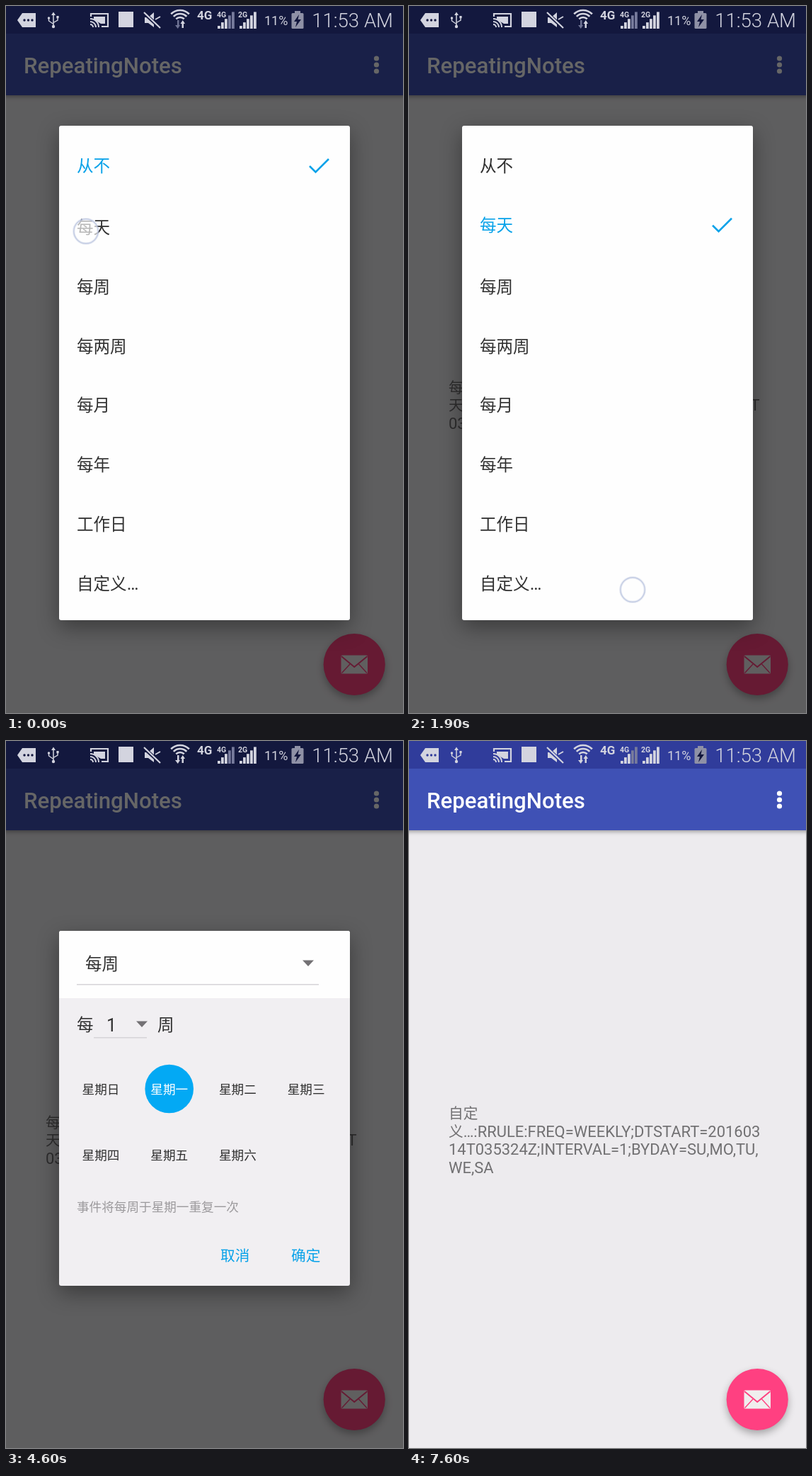
Recreate the animation shown at these times as an HTML page with a canvas. Size 561 px wide and 998 px high, loop 8000 ms.

```html
<!DOCTYPE html>
<html lang="zh-CN">
<head>
<meta charset="utf-8">
<title>Repeat picker</title>
<style>
html, body { margin: 0; width: 100%; height: 100%; overflow: hidden; background: #edebee; }
canvas { display: block; width: 561px; height: 998px; }
</style>
</head>
<body>
<canvas id="stage"></canvas>
<script>
const W = 561, H = 998, LOOP = 8000;
const canvas = document.getElementById('stage');
const ctx = canvas.getContext('2d');
const dpr = window.devicePixelRatio || 1;
canvas.width = W * dpr;
canvas.height = H * dpr;

const INK = '#303030', ACCENT = '#03a9f4', LINK = '#08a2e9', PINK = '#ff4081';
const ICON = '#d3d4df';
const LATIN = 'Roboto, "Noto Sans", sans-serif';
const CJK = '"Noto Sans CJK SC", "Noto Sans CJK", sans-serif';
const LEFT = 75, WIDTH = 411;

const OPTIONS = ['从不', '每天', '每周', '每两周', '每月', '每年', '工作日', '自定义…'];
const UNITS = ['每天', '每周', '每月', '每年'];
const DAYS = [...'日一二三四五六'].map(d => '星期' + d);
const PICKED_AT = [6850, 0, 5500, 6000, Infinity, Infinity, 6400];
const DAILY = ['每', '天:RRULE:FREQ=DAILY;DTSTART=20160314T', '035322Z;INTERVAL=1'];
const WEEKLY = ['自定', '义…:RRULE:FREQ=WEEKLY;DTSTART=201603',
  '14T035324Z;INTERVAL=1;BYDAY=SU,MO,TU,', 'WE,SA'];

// start, end, x, y
const TOUCHES = [
  [0, 150, 113, 318], [800, 1000, 162, 583], [1900, 2100, 316, 824],
  [3000, 3180, 166, 417], [3900, 4080, 182, 484], [5400, 5580, 330, 494],
  [5900, 6080, 427, 494], [6300, 6480, 330, 588], [6750, 6930, 137, 484],
  [7200, 7400, 437, 742]
];

const ramp = (t, a, b) => Math.min(1, Math.max(0, (t - a) / (b - a)));
const ease = (t, a, b) => { const k = ramp(t, a, b); return k * k * (3 - 2 * k); };
const within = (t, a, b) => t >= a && t < b;

function mix(rgb, k) {
  return `rgb(${rgb.map(v => Math.round(v * k)).join(',')})`;
}

function rect(x, y, w, h, color) {
  ctx.fillStyle = color;
  ctx.fillRect(x, y, w, h);
}

function disc(x, y, r, color) {
  ctx.beginPath();
  ctx.arc(x, y, r, 0, 7);
  ctx.fillStyle = color;
  ctx.fill();
}

function path(points, closed) {
  ctx.beginPath();
  points.forEach(([x, y]) => ctx.lineTo(x, y));
  if (closed) ctx.closePath();
}

function shape(points, color) {
  path(points, true);
  ctx.fillStyle = color;
  ctx.fill();
}

function line(points, color, width) {
  path(points);
  ctx.strokeStyle = color;
  ctx.lineWidth = width;
  ctx.stroke();
}

function arc(x, y, r, a, b, color, width) {
  ctx.beginPath();
  ctx.arc(x, y, r, a, b);
  ctx.strokeStyle = color;
  ctx.lineWidth = width;
  ctx.stroke();
}

function panel(x, y, w, h, r, color) {
  ctx.beginPath();
  ctx.roundRect(x, y, w, h, r);
  ctx.fillStyle = color;
  ctx.fill();
}

function shadowed(blur, dy, alpha, draw) {
  ctx.save();
  ctx.shadowColor = `rgba(0,0,0,${alpha})`;
  ctx.shadowBlur = blur * dpr;
  ctx.shadowOffsetY = dy * dpr;
  draw();
  ctx.restore();
}

function faded(alpha, draw) {
  if (alpha <= 0) return;
  ctx.save();
  ctx.globalAlpha *= alpha;
  draw();
  ctx.restore();
}

// Chinese runs are set a little smaller than Latin runs.
function text(s, x, y, size, color, align = 0, weight = 400) {
  const runs = s.match(/[\u4e00-\u9fff]+|[^\u4e00-\u9fff]+/g);
  const font = run => /[\u4e00-\u9fff]/.test(run)
    ? `${weight} ${size * 0.942}px ${CJK}` : `${weight} ${size}px ${LATIN}`;
  const widths = runs.map(run => {
    ctx.font = font(run);
    return ctx.measureText(run).width;
  });
  x -= widths.reduce((a, b) => a + b, 0) * align;
  ctx.fillStyle = color;
  runs.forEach((run, i) => {
    ctx.font = font(run);
    ctx.fillText(run, x, Math.round(y + size * 0.358));
    x += widths[i];
  });
}

function bars(x, strong) {
  for (let i = 0; i < 5; i++) {
    const h = 4 + i * 4.9;
    rect(x + i * 5, 32 - h, 3.8, h, i < strong ? ICON : '#777b9c');
  }
}

function statusIcons(t, back) {
  const c = ICON;
  shape([[16, 20], [23, 10], [42, 10], [42, 30], [23, 30]], c);
  for (const x of [26, 31.5, 37]) disc(x, 20, 1.7, back);

  line([[67, 11], [67, 30]], c, 1.5);
  shape([[64, 13], [67, 8.5], [70, 13]], c);
  line([[60.5, 17], [60.5, 21], [67, 25.5]], c, 1.4);
  line([[73, 16], [73, 20], [67, 23.5]], c, 1.4);
  disc(60.5, 17, 1.7, c);
  disc(67, 29, 2.2, c);
  rect(71.4, 14, 3.2, 3.2, c);

  line([[120, 15], [120, 11], [144, 11], [144, 29], [135, 29]], c, 2.2);
  shape([[124, 15], [140, 15], [140, 25], [134, 25], [124, 19]], c);
  for (const r of [4, 8, 12]) arc(119, 30, r, -Math.PI / 2, 0, c, 2);

  rect(159, 8, 21, 22, c);

  shape([[196, 16], [201, 16], [209, 9], [209, 30], [201, 24], [196, 24]], c);
  line([[195, 10], [217, 30]], back, 5);
  line([[195, 9], [218, 31]], c, 2.2);
  line([[211, 19], [218, 15]], c, 2);

  for (const r of [8, 13, 18]) arc(246, 24, r, -2.36, -0.78, c, 2.7);
  const busy = within(t, 400, 1400) || within(t, 3900, 5200) || t >= 5400;
  shape([[239, 27], [242, 27], [242, 20], [244.5, 20], [244.5, 27], [246, 27], [242.8, 32]],
    busy ? c : '#6f7394');
  shape([[246.5, 25], [249.8, 20], [253, 25], [251, 25], [251, 31], [248.5, 31], [248.5, 25]], c);

  text('4G', 270, 13, 17, c, 0, 700);
  bars(299, 3);
  bars(330, 5);
  panel(297, 6, 16, 12, 0, back);
  panel(327, 6, 15, 12, 0, back);
  text('4G', 298, 12, 10.5, c, 0, 700);
  text('2G', 328, 12, 10.5, c, 0, 700);
  text('11%', 365, 20.5, 18, c);
  rect(408, 7, 8, 4, '#8f91a6');
  panel(403.5, 10, 17, 22, 1.5, '#8f91a6');
  shape([[414, 12], [407, 22], [411, 22], [409, 30], [417, 19], [412.5, 19]], '#12163c');
  text('11:53 AM', 547, 20, 27.6, c, 1, 300);
}

function mailButton() {
  shadowed(11, 5, 0.3, () => disc(492.2, 929.5, 43.6, PINK));
  panel(473.5, 916.5, 37.5, 26, 1.5, '#f0eeee');
  line([[474, 918], [492.2, 933], [510.5, 918]], PINK, 1.9);
  line([[474.5, 941.5], [486, 929]], PINK, 1.4);
  line([[510, 941.5], [498.5, 929]], PINK, 1.4);
}

function screen(t, dim) {
  rect(0, 0, W, H, '#edebee');
  if (t >= 100) {
    const lines = t < 7320 ? DAILY : WEEKLY;
    const top = 563.5 - (lines.length - 1) * 12.75;
    lines.forEach((s, i) => text(s, 56, top + i * 25.5, 21.95, '#717072'));
  }
  shadowed(6, 2, 0.36, () => rect(-10, 39, W + 20, 87, '#3f51b5'));
  rect(0, 0, W, 39, '#303c9b');
  text('RepeatingNotes', 25, 83.5, 31.2, '#fff', 0, 500);
  for (const y of [74, 83, 92]) disc(523.5, y, 3.6, '#fff');
  mailButton();

  rect(0, 0, W, H, `rgba(0,0,0,${0.6 * dim})`);
  statusIcons(t, mix([48, 60, 155], 1 - 0.6 * dim));
}

function dialogCard(y, h, color) {
  shadowed(30, 10, 0.38, () => panel(LEFT, y, WIDTH, h, 3, color));
}

function optionList(selected) {
  dialogCard(169, 698, '#fefefe');
  OPTIONS.forEach((s, i) => {
    const y = 225 + i * 83.75 + (i > selected ? 3.3 : 0);
    text(s, 100, y, 25, i === selected ? LINK : INK);
    if (i === selected) line([[429, y + 1], [437.5, y + 9.5], [456, y - 9]], LINK, 2.6);
  });
}

function spinner(x1, x2, arrowX, y, lineY) {
  rect(x1, lineY, x2 - x1, 1.5, '#d6d4d8');
  shape([[arrowX - 8, y - 4.5], [arrowX + 8, y - 4.5], [arrowX, y + 4]], '#737174');
}

function summary(t) {
  const on = DAYS.filter((d, i) => t >= PICKED_AT[i]);
  const last = on.pop();
  const list = on.length ? on.join(', ') + '和' + last : last;
  const full = `事件将每周于${list}重复一次`;
  if (on.length < 3) return [full];
  const cut = full.indexOf(last) + (on.length === 3 ? 3 : 0);
  return [full.slice(0, cut), full.slice(cut)];
}

function customDialog(t) {
  const weekly = t >= 4250;
  const hint = weekly ? summary(t) : ['事件将每天重复一次'];
  const extra = (hint.length - 1) * 22;
  const h = (weekly ? 501 : 315) + extra;
  const top = Math.round(518.3 - h / 2);

  dialogCard(top, h, '#f1eff2');
  panel(LEFT, top, WIDTH, 95, [3, 3, 0, 0], '#fefefe');
  text(weekly ? '每周' : '每天', 112, top + 46, 25, INK);
  spinner(100, 442, 427, top + 46, top + 75);

  text('每', 100, top + 132, 25, INK);
  text('1', 149, top + 133, 25, INK, 0.5);
  text(weekly ? '周' : '天', 214, top + 132, 25, INK);
  spinner(124, 199, 192, top + 132, top + 150);

  if (weekly) DAYS.forEach((d, i) => {
    const x = 134 + (i % 4) * 96.7;
    const y = top + 223 + Math.floor(i / 4) * 93.5;
    const on = t >= PICKED_AT[i];
    if (on) disc(x, y, 34.3, ACCENT);
    text(d, x, y, 18.7, on ? '#fff' : INK, 0.5);
  });

  const hintY = top + (weekly ? 389.5 : 190);
  hint.forEach((s, i) => text(s, 100, hintY + i * 22, 18.7, '#9c9a9d'));
  const buttonY = top + h - (weekly ? 43 : 56);
  text('取消', 323.7, buttonY, 21.9, LINK, 0.5);
  text('确定', 423.7, buttonY, 21.9, LINK, 0.5);
}

function dropdown(t) {
  const open = ease(t, 3100, 3400);
  faded(ramp(t, 3080, 3200) * (1 - ramp(t, 4030, 4250)), () => {
    const h = 75 + 225 * open;
    shadowed(16, 6, 0.35, () => panel(100, 369, 342, h, 2, '#fefefe'));
    ctx.beginPath();
    ctx.rect(100, 369, 342, h);
    ctx.clip();
    UNITS.forEach((s, i) => text(s, 112, 407 + i * 75, 25, INK));
  });
}

function touch(t) {
  for (const [a, b, x, y] of TOUCHES) {
    if (!within(t, a, b)) continue;
    faded(1 - ramp(t, b - 60, b), () => {
      disc(x, y, 17.5, 'rgba(255,255,255,.65)');
      arc(x, y, 17.2, 0, 7, 'rgba(170,182,215,.25)', 3.5);
      arc(x, y, 17.2, 0, 7, 'rgba(178,190,220,.7)', 1.4);
    });
  }
}

function draw(t) {
  ctx.setTransform(dpr, 0, 0, dpr, 0, 0);
  const first = 1 - ease(t, 60, 400);
  const second = ease(t, 880, 1200);
  const closing = 1 - ease(t, 7310, 7590);
  screen(t, Math.max(first, second * closing));

  faded(first, () => optionList(0));
  faded(second * (1 - ease(t, 2050, 2250)), () => optionList(1));
  faded(ease(t, 2100, 2400) * closing, () => customDialog(t));
  dropdown(t);
  touch(t);
}

function tick(now) {
  draw(now % LOOP);
  requestAnimationFrame(next => tick(Math.max(0, next - origin)));
}
const origin = performance.now();
tick(0);
</script>
</body>
</html>
```
